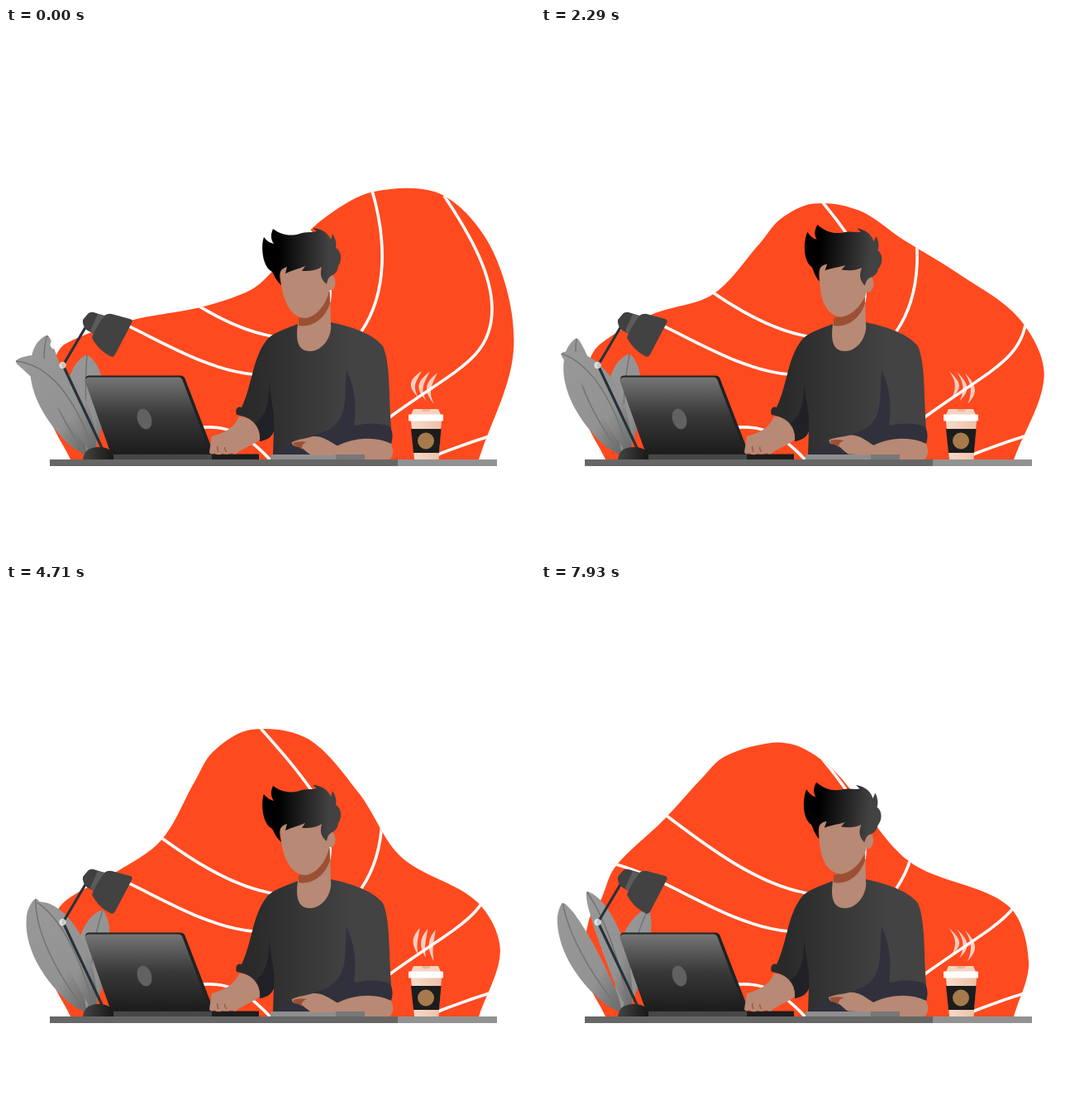
Animation, 640 px wide and 640 px high, one loop 8 s. Source, as an HTML page:

```html
<!DOCTYPE html>
<html lang="en">
<head>
<meta charset="utf-8">
<title>Working at the desk</title>
<style>
  html, body { margin: 0; height: 100%; overflow: hidden; background: #fff; }
  svg { display: block; width: 100%; height: 100%; }
</style>
</head>
<body>
<svg viewBox="0 0 640 640">
  <defs>
    <clipPath id="blobClip"><path id="blobEdge"/></clipPath>
    <linearGradient id="hairFill"><stop offset=".2"/><stop offset=".85" stop-color="#424242"/></linearGradient>
    <linearGradient id="shirtFill"><stop offset=".1" stop-color="#2a2a2a"/><stop offset=".75" stop-color="#434343"/></linearGradient>
    <linearGradient id="screenFill" x2="0" y2="1"><stop stop-color="#757575"/><stop offset=".5" stop-color="#383838"/><stop offset="1" stop-color="#1c1c1c"/></linearGradient>
    <linearGradient id="leafFill" x2="1" y2="1"><stop stop-color="#999"/><stop offset=".65" stop-color="#929292"/><stop offset="1" stop-color="#666"/></linearGradient>
    <linearGradient id="baseFill"><stop stop-color="#444"/><stop offset="1" stop-color="#161616"/></linearGradient>
    <linearGradient id="cupFill"><stop stop-color="#f6dccb"/><stop offset="1" stop-color="#eec0a8"/></linearGradient>
  </defs>

  <!-- background shape and its lines -->
  <g clip-path="url(#blobClip)">
    <rect width="640" height="522" fill="#ff4a1f"/>
    <g fill="none" stroke="#fff" stroke-width="3.6">
      <path d="M443 197C460 255 462 320 430 367"/>
      <path d="M530 203C565 255 588 300 588 340C588 400 545 412 464 471"/>
      <path d="M520 517Q555 503 594 491"/>
      <path d="M140 270C205 320 262 362 322 373"/>
      <path d="M82 336C150 350 222 412 300 419"/>
      <path d="M230 484C270 478 295 495 322 525"/>
      <path d="M46 462L74 469"/>
      <path d="M290 153C330 198 350 220 372 252C390 285 395 305 391 332"/>
    </g>
  </g>

  <!-- plant -->
  <path id="rightLeaf" fill="url(#leafFill)"/>
  <path id="rightRib" class="rib"/>
  <path id="backLeaf" fill="url(#leafFill)"/>
  <path id="backRib" class="rib"/>
  <circle cx="59" cy="383" r="5.500" fill="#fff"/>
  <path id="frontLeaf" fill="url(#leafFill)"/>
  <path id="frontRib" class="rib"/>
  <style>.rib { fill: none; stroke: #737373; stroke-width: 1.5; }</style>

  <!-- lamp -->
  <path d="M98 359L69 408L118 512" fill="none" stroke="#263238" stroke-width="3.2"/>
  <circle cx="68.500" cy="408" r="4.200" fill="#fff" opacity=".72"/>
  <path d="M93 353L98 347Q101 343 106 344L119 348L106 370L97 365Q92 359 93 353Z" fill="#404040"/>
  <path d="M111 346L119 348L107 372L102 366Z" fill="#5b5b5b"/>
  <path d="M119 348Q123 345 128 346L150 352Q154 353 152 357L132 395Q130 399 126 397Q112 390 104 375Q106 367 119 348Z" fill="#424242"/>
  <path d="M93 522C94 511 102 507 112 507C124 507 131 512 131 522Z" fill="url(#baseFill)"/>

  <!-- body -->
  <path d="M353 358C336 365 322 369 315 378C298 400 298 432 285 459C279 457 277 463 279 468C296 470 309 483 307 500C318 498 324 492 324 485L323 517H400L466 502C469 495 466 488 466 484C463 445 465 405 456 385C444 370 420 362 393 356Z" fill="url(#shirtFill)"/>
  <path d="M318 422C319 450 326 462 324 488C321 496 314 499 307 500C309 490 305 482 302 478C316 468 319 450 318 422Z" fill="#202126"/>
  <path d="M412 414C409 445 415 470 392 485C370 497 335 500 326 517H400L402 500C415 486 440 485 421 480C425 455 421 432 412 414Z" fill="#30313c"/>
  <path d="M388 497C410 482 438 474 462 481C469 485 468 496 466 503C440 494 416 497 398 509Z" fill="#30313c"/>
  <path d="M353 358L392 318L393 358C395 373 383 391 368 391C354 391 350 380 353 358Z" fill="#b88975"/>
  <path d="M354 351C370 348 386 330 391 316L392 333C386 352 370 363 354 360Z" fill="#9b5034"/>

  <g id="head">
    <ellipse cx="393" cy="308" rx="5.500" ry="9.500" fill="#b88975"/>
    <path d="M331 285L384 281L392 310C391 330 378 348 363 351C345 351 336 332 333 310Z" fill="#b88975"/>
    <path d="M333 311C327 306 325 300 322 295C310 289 308 264 312 253C316 258 319 260 324 261C319 254 321 248 323 243C334 251 344 252 355 249C364 246 368 248 376 246L371 242C382 243 389 247 393 256L395 249C399 255 400 261 399 266C406 270 407 281 402 288C401 296 397 298 393 300C389 303 389 306 388 310C380 303 380 297 382 289C374 294 366 294 358 294L362 288C353 292 346 293 338 297L340 289C330 292 330 298 333 311Z" fill="url(#hairFill)"/>
  </g>

  <!-- laptop -->
  <path d="M130 515H249V522H130Z" fill="#474747"/>
  <path d="M249 515.500H306V522H249Z" fill="#1d1d1d"/>
  <path d="M101 420.500H211Q215 420.500 216.500 424L250 511Q251 516 246 516H131Q127 516 126 512L96 427Q95 420.500 101 420.500Z" fill="#222"/>
  <path d="M101 422.500H209Q212 422.500 213.500 426L245 509Q247 515 242 515H131Q127 515 126 512L96 428Q95 422.500 101 422.500Z" fill="url(#screenFill)"/>
  <ellipse cx="167.500" cy="473" rx="8.500" ry="12.700" fill="#606163" transform="rotate(-18 167.500 473)"/>

  <!-- desk -->
  <path d="M53 522H474V530H53Z" fill="#666"/>
  <path d="M474 522H594V530H474Z" fill="#929292"/>
  <path d="M320 516H399V522H320Z" fill="#8e8e8e"/>
  <path d="M399 516H434V522H399Z" fill="#777"/>

  <!-- arms -->
  <path d="M282 470C298 470 308 484 307 498C296 506 284 510 280 514Q277 517 273 514Q268 517 262 515Q256 518 252 514Q247 517 246 513L249 494C264 490 276 484 282 470Z" fill="#b88975"/>
  <path d="M257 513q-2-4-1-7M267 513q-3-3-2-6" fill="none" stroke="#9b5034" stroke-width="1.200"/>
  <path d="M394 509C418 495 446 493 466 503C470 512 468 519 464 522H434V516H385Z" fill="#b88975"/>
  <g id="hand">
    <path d="M346 501C354 497 363 497 371 494C383 493 391 500 402 506L396 517H370C363 514 361 507 349 506Q345 504 346 501Z" fill="#b88975"/>
    <path d="M347 502Q356 499 364 501Q357 503 358 510Q354 506 349 506Z" fill="#9b5034"/>
  </g>

  <!-- cup -->
  <path d="M490 475H527L523.500 522H494Z" fill="url(#cupFill)"/>
  <path d="M490 485H526.500L524 514H493Z" fill="#1c1c1c"/>
  <circle cx="508" cy="499.500" r="10" fill="#a67a4c"/>
  <path d="M490 468L493 461H523L526 468Z" fill="#f5d3c1"/>
  <path d="M503 461H514L512 464H504Z" fill="#e9b59b"/>
  <rect x="487" y="467.500" width="42" height="8" rx="1" fill="#fff"/>
  <path id="steam" fill="#fff" opacity=".72"/>
</svg>
<script>
const $ = id => document.getElementById(id);
const LOOP = 8000;
const mix = (a, b, k) => a + (b - a) * k;
const mixPoint = (a, b, k) => a.map((v, n) => mix(v, b[n], k));
const smooth = x => (x = Math.min(1, Math.max(0, x))) * x * (3 - 2 * x);
const distance = (a, b) => Math.hypot(b[0] - a[0], b[1] - a[1]);

// The blob's feet stay put; a few anchors of its crest glide between poses.
const leftFoot = [[78, 522], [52, 466], [58, 405], [72, 382]];
const rightFoot = [[572, 522]];
const poses = [
  { at: 0, crest: '150,354 235,338 290,320 312,305 345,269 385,230 445,198 528,202 590,272 614,390' },
  { at: 3000, crest: '130,344 200,317 257,242 283,208 325,195 385,218 436,274 500,328 575,376 607,430' },
  { at: 6000, crest: '135,350 179,302 206,236 226,197 275,160 350,162 420,235 462,330 565,388 591,450' },
  { at: LOOP, crest: '88,341 147,284 194,234 222,208 279,192 314,198 356,228 444,334 565,388 590,456' }
].map(({ at, crest }) => ({ at, crest: crest.split(' ').map(p => p.split(',').map(Number)) }));

function blobPoints(t) {
  const next = poses.findIndex(pose => pose.at > t);
  const [from, to] = [poses[next - 1], poses[next]];
  const k = (t - from.at) / (to.at - from.at);
  return [...leftFoot, ...from.crest.map((p, i) => mixPoint(p, to.crest[i], k)), ...rightFoot];
}

// smooth curve through points, tangents scaled by the chord lengths
function spline(points) {
  const last = points.length - 1;
  const tangents = points.map((p, i) => {
    const a = points[Math.max(0, i - 1)], c = points[Math.min(last, i + 1)];
    const length = distance(a, p) + distance(p, c);
    return [(c[0] - a[0]) / length, (c[1] - a[1]) / length];
  });
  let d = 'M' + points[0];
  for (let i = 0; i < last; i++) {
    const b = points[i], c = points[i + 1], reach = distance(b, c) / 3;
    d += `C${b.map((v, n) => v + tangents[i][n] * reach)} ` +
      `${c.map((v, n) => v - tangents[i + 1][n] * reach)} ${c}`;
  }
  return d;
}

// A leaf is a bent rib with a rounded width profile; bend, tip and width sway from one end to the other.
const leaves = [
  { name: 'right', base: [100, 518], bend: [[94, 440], [106, 440]], tip: [[98, 396], [130, 392]], width: [23, 18] },
  { name: 'back', base: [98, 518], bend: [[32, 424], [37, 442]], tip: [[50, 372], [26, 385]], width: [20, 18] },
  { name: 'front', base: [108, 518], bend: [[72, 409], [88, 418]], tip: [[12, 403], [56, 371]], width: [18, 14] }
];

function drawLeaf({ name, base, bend, tip, width }, k) {
  const control = mixPoint(...bend, k), end = mixPoint(...tip, k), half = mix(...width, k);
  const left = [], right = [], steps = 10;
  for (let i = 0; i <= steps; i++) {
    const u = i / steps;
    const a = mixPoint(base, control, u), b = mixPoint(control, end, u);
    const [x, y] = mixPoint(a, b, u);
    const w = half * Math.sin(Math.PI * u) ** 0.6 / distance(a, b);
    const nx = (b[1] - a[1]) * w, ny = (a[0] - b[0]) * w;
    left.push([x + nx, y + ny]);
    if (i < steps) right.unshift([x - nx, y - ny]);
  }
  $(name + 'Leaf').setAttribute('d', spline([...left, ...right]) + 'Z');
  $(name + 'Rib').setAttribute('d', `M${base}Q${control} ${end}`);
}

// one S-shaped ribbon, mirrored as sway goes from 1 to -1
function wisp(x, top, height, sway) {
  const point = (dx, k) => `${x + dx} ${top + height * k}`;
  const near = -6 * sway, far = -11 * sway;
  return `M${point(5 * sway, 0)}C${point(near - 3, .3)} ${point(far - 3, .55)} ${point(sway, 1)}` +
    `C${point(far + 4, .6)} ${point(near + 4, .4)} ${point(5 * sway, 0)}Z`;
}

function draw(t) {
  $('blobEdge').setAttribute('d', spline(blobPoints(t)) + 'Z');
  for (const leaf of leaves) drawLeaf(leaf, t / LOOP);

  const phase = t / 4710 % 1;
  const nod = smooth(Math.min(phase, 1 - phase) / 0.4);
  $('head').setAttribute('transform', `rotate(${6.3 * nod} 375 345)`);
  $('hand').setAttribute('transform', `translate(${2 * nod}) rotate(${3 * nod} 400 512)`);

  const sway = Math.cos(2 * Math.PI * t / 5600);
  $('steam').setAttribute('d', [0, 1, 2].map(i => wisp(498 + 9.5 * i, 415 + i, 32 + 3 * i, sway)).join(''));
}

function tick() {
  draw(performance.now() % LOOP);
  requestAnimationFrame(tick);
}
tick();
</script>
</body>
</html>
```
